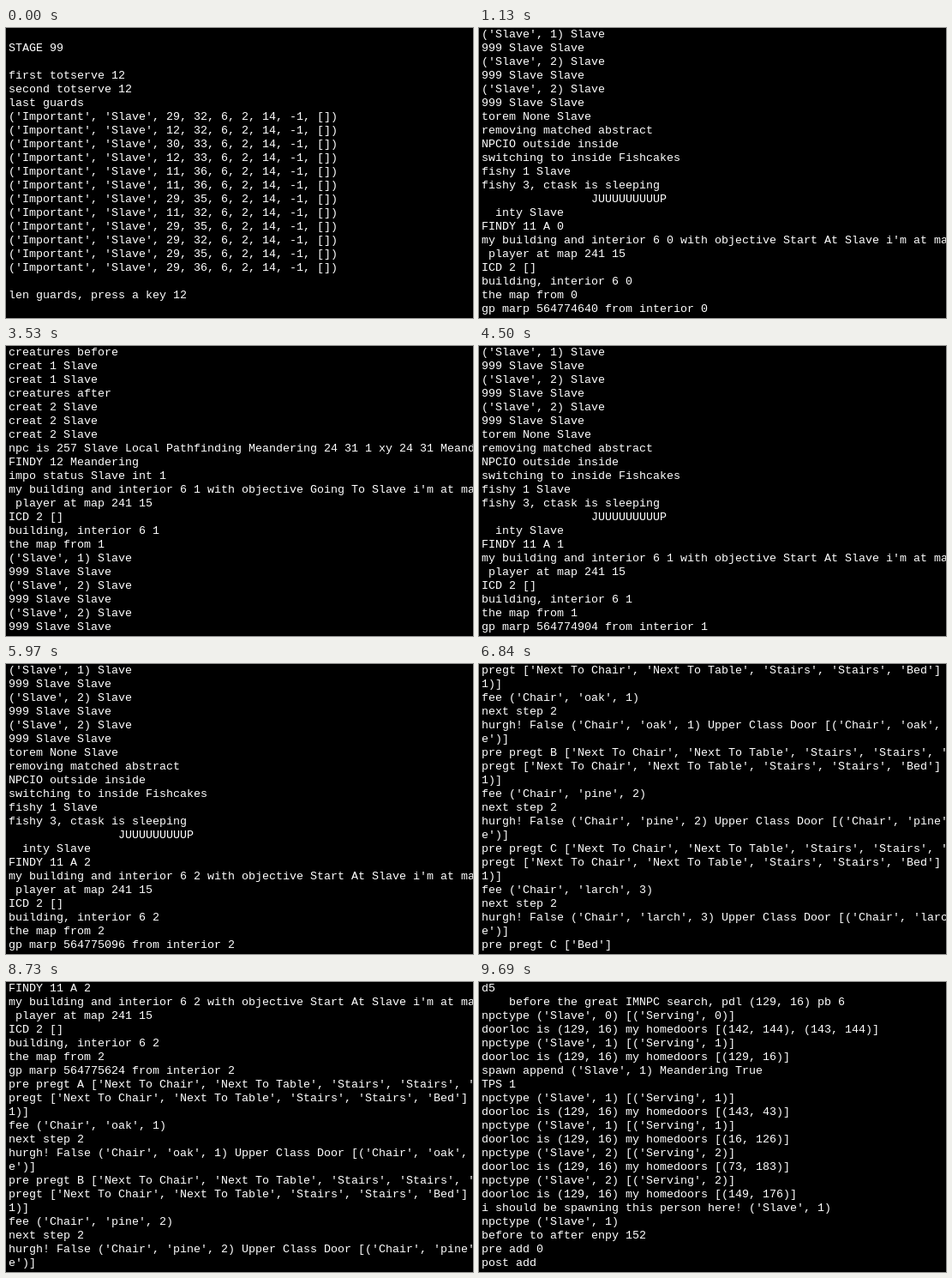
These frames come from a looping animation (545 by 338 pixels, 10 s). An HTML page:

```html
<!DOCTYPE html>
<html lang="en">
<head>
<meta charset="utf-8">
<title>Console log</title>
<style>
html, body { margin: 0; width: 100%; height: 100%; overflow: hidden; background: #000; }
pre {
  box-sizing: border-box; width: 100%; height: 100%; margin: 0; padding-left: 3px;
  overflow: hidden; contain: strict;
  font: 13.333px/16px "Liberation Mono", "Courier New", monospace;
  color: #fff;
}
</style>
</head>
<body>
<pre id="screen"></pre>
<script>
const ROWS = 21, LOOP = 10000;

// Bursts of screen updates: [first time, count], 120 ms apart
const steps = [
  [0, 1], [300, 1], [580, 2], [850, 2], [1130, 1], [1280, 7], [2150, 3], [2540, 2],
  [2810, 9], [3890, 5], [4500, 1], [4650, 2], [4920, 2], [5190, 1], [5340, 4],
  [5850, 2], [6120, 1], [6270, 1], [6420, 1], [6570, 2], [6840, 4], [7350, 4],
  [7860, 6], [8610, 9], [9690, 1]
].flatMap(([t, n]) => Array.from({ length: n }, (_, i) => t + 120 * i));

const log = [], marks = [];
const say = text => log.push(...text.split('\n'));
const repeat = (n, text) => { for (let i = 0; i < n; i++) say(text); };
// The log has scrolled exactly this far at the given time
const mark = time => marks.push({ step: steps.indexOf(time), end: log.length });

const posts = ['29, 32', '12, 32', '30, 33', '12, 33', '11, 36', '11, 36',
  '29, 35', '11, 32', '29, 35', '29, 32', '29, 35', '29, 36'];
const taken = ['(30, 32)', '(29, 35)', '(29, 36)', '(12, 33)', '(11, 36)', '(11, 32)'];
const floors = [0, 1, 1, 1, 1, 1, 2, 2, 2, 2, 2, 2];
const rooms = "['Next To Chair', 'Next To Table', 'Stairs', 'Stairs', 'Bed']";
const bed = "('Bed', 'larch', 'Simple')";

function opening() {
  say('\nSTAGE 99\n\nfirst totserve 12\nsecond totserve 12\nlast guards');
  posts.forEach(p => say(`('Important', 'Slave', ${p}, 6, 2, 14, -1, [])`));
  say('\nlen guards, press a key 12\n');
}

function checks() {
  for (const n of [1, 2, 2]) say(`('Slave', ${n}) Slave\n999 Slave Slave`);
}

function locate(n, goal) {
  say(`my building and interior 6 ${n} with objective ${goal} Slave i'm at map 241 15
 player at map 241 15
ICD 2 []
building, interior 6 ${n}
the map from ${n}`);
}

function arrive(g, n) {
  checks();
  say(`torem None Slave
removing matched abstract
NPCIO outside inside
switching to inside Fishcakes
fishy 1 Slave
fishy 3, ctask is sleeping
                JUUUUUUUUUP
  inty Slave
FINDY 11 A ${n}`);
  locate(n, 'Start At');
  say(`gp marp ${564774640 + 24 * Math.floor(.26 * g * g + .91 * g)} from interior ${n}`);
}

function attempts(n) {
  ['oak', 'pine', 'larch'].forEach((wood, i) => {
    const item = `('Chair', '${wood}', ${i + 1})`;
    say(`pre pregt ${'ABC'[i]} ${rooms}
pregt ${rooms} creas []
1)]
fee ${item}
next step ${n}
hurgh! False ${item} Upper Class Door [${item}, ${item}]
e')]`);
  });
}

function settle(g, n, before) {
  const x = 24 + Math.floor(.9 * (g - 2)), y = 31 + Math.floor(.75 * (g - 2));
  if (n < 2) say(`pre pregt C ${rooms}
pregt ${rooms} creas []
1)]
fee ('Table', 'pine', 3)
next step ${n}`);
  else say(`pre pregt C ['Bed']
pregt ['Bed'] creas [${taken.slice(0, before).join(', ')}]
fee ${bed}
next step ${n}
hurgh! False ${bed} Upper Class Door [${bed}]
e')]
full bed check ${x} ${y} ${n} 6
bedreturn false`);
  say(`success with (${x}, ${y})
i'm Slave going to Stationary ${posts[g].replace(',', '')} whilst Local Pathfinding ${n}
FINDY 11 B ${n}
npc interior is ${n} ${n} 6
creatures before`);
  repeat(before, 'creat 1 Slave');
  say('creatures after');
  repeat(before + 1, 'creat 2 Slave');
  if (g === 9) mark(7590);
  say(`npc is 257 Slave Local Pathfinding Meandering ${x} ${y} ${n} xy ${x} ${y} Meandering
FINDY 12 Meandering
impo status Slave int ${n}`);
  locate(n, 'Going To');
  if (g === 2) mark(2660);
}

function search(d) {
  const homes = ['(142, 144), (143, 144)', '(129, 16)', '(143, 43)', '(16, 126)', '(73, 183)', '(149, 176)'];
  say(`d${d}\n    before the great IMNPC search, pdl (129, 16) pb 6`);
  [0, 1, 1, 1, 2, 2].forEach((type, i) => {
    say(`npctype ('Slave', ${type}) [('Serving', ${type})]
doorloc is (129, 16) my homedoors [${homes[(i + 5 - d) % 6]}]`);
    if (i === 1) say("spawn append ('Slave', 1) Meandering True\nTPS 1");
  });
  say(`i should be spawning this person here! ('Slave', 1)
npctype ('Slave', 1)
before to after enpy 152
pre add 0
post add`);
}

opening();
mark(0);
repeat(3, "('Slave', 0) Slave\n999 Slave Slave");
checks();
checks();
attempts(0);
attempts(0);
floors.forEach((n, g) => {
  arrive(g, n);
  const time = { 0: 1130, 5: 4500, 7: 5970 }[g];
  if (time) mark(time);
  attempts(n);
  settle(g, n, g - floors.indexOf(n));
});
[3, 4, 5].forEach(search);
mark(9690);

// Last visible line at a step, evenly scrolled between marks
function endAt(step) {
  const i = Math.max(1, marks.findIndex(m => m.step >= step));
  const a = marks[i - 1], b = marks[i];
  return Math.round(a.end + (b.end - a.end) * (step - a.step) / (b.step - a.step));
}

const view = document.getElementById('screen');
let shown = -1;
function draw() {
  const t = performance.now() % LOOP;
  const step = steps.filter(s => s <= t).length - 1;
  if (step !== shown) {
    shown = step;
    const end = endAt(step);
    view.textContent = log.slice(end - ROWS, end).join('\n');
  }
  requestAnimationFrame(draw);
}
draw();
</script>
</body>
</html>
```
